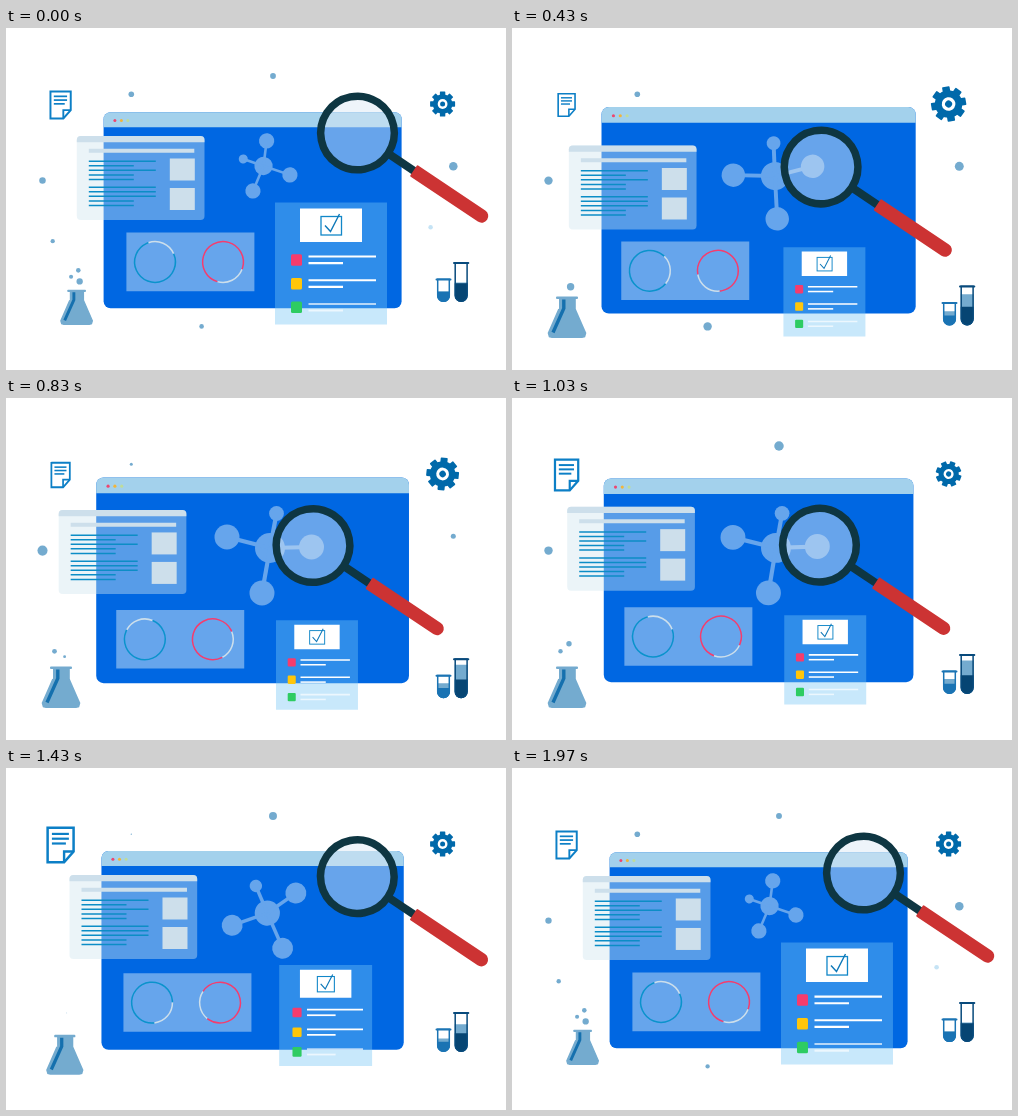
An HTML page with a canvas that plays this animation: 500x342 px, repeating every 2000 ms.

```html
<!DOCTYPE html>
<html lang="en">
<head>
<meta charset="utf-8">
<title>Research dashboard</title>
<style>
html, body { margin: 0; width: 100%; height: 100%; overflow: hidden; background: #fff; }
canvas { display: block; }
</style>
</head>
<body>
<canvas id="stage" width="500" height="342"></canvas>
<script>
const g = document.getElementById('stage').getContext('2d');
const LOOP = 2000, FADE = 130, TAU = Math.PI * 2, RAD = Math.PI / 180;
const MIST = '#cddfeb', SKY = '#66a5ec', DOT = '#74abcf', PINK = '#f53c6d', TEAL = '#0a93cc';
let t = 0;

const clamp = u => Math.min(1, Math.max(0, u));
const mix = (a, b, p) => a + (b - a) * p;
const ease = (from, to) => (1 - Math.cos(Math.PI * clamp((t - from) / (to - from)))) / 2;
// Rises from 0 to 1 between a and b, falls back to 0 between c and d.
const swing = (a, b, c, d) => ease(a, b) * (1 - ease(c, d));
// The tempo shared by the parts that drift out and slowly return.
const drift = () => swing(0, 583, 600, LOOP);
const linger = () => swing(0, 583, 975, LOOP);

function box(x, y, w, h, color, r = 0) {
  g.fillStyle = color;
  g.beginPath();
  g.roundRect(x, y, w, h, r);
  g.fill();
}

function dot(x, y, r, color) {
  g.fillStyle = color;
  g.beginPath();
  g.arc(x, y, r, 0, TAU);
  g.fill();
}

// A dot that pops in at one time and out at another, changing its radius in between.
function speck(x, y, on, off, r0, r1 = r0, color = DOT) {
  const age = (t - on + LOOP) % LOOP, span = off - on;
  const size = clamp(Math.min(age, span - age) / FADE);
  dot(x, y, mix(r0, r1, clamp(age / span)) * size, color);
}

function arc(x, y, r, from, to, color, width) {
  g.strokeStyle = color;
  g.lineWidth = width;
  g.beginPath();
  g.arc(x, y, r, from * RAD, to * RAD);
  g.stroke();
}

function trace(points) {
  g.beginPath();
  for (let i = 0; i < points.length; i += 2) g.lineTo(points[i], points[i + 1]);
}

function line(color, width, ...points) {
  g.strokeStyle = color;
  g.lineWidth = width;
  trace(points);
  g.stroke();
}

function group(x, y, scale, angle, draw) {
  g.save();
  g.translate(x, y);
  g.rotate(angle * RAD);
  g.scale(scale, scale);
  draw();
  g.restore();
}

const zoom = () => swing(0, 500, 500, 1900);

function browser() {
  group(246.6, 182.3, mix(1, 1.057, zoom()), 0, () => {
    box(-149, -98, 298, 196, '#0067e2', 7);
    box(-149, -98, 298, 15, '#a3d1ec', [7, 7, 0, 0]);
    ['#ee4670', '#f2b53a', '#bfdc9a'].forEach((c, i) => dot(-137.7 + i * 6.5, -89.7, 1.5, c));
  });
}

function molecule() {
  const p = linger();
  group(mix(257.5, 264, p), mix(138, 150, p), mix(.61, 1, p), mix(-81.5, 0, p), () => {
    dot(0, 0, 15, SKY);
    for (const [x, y, r] of [[6.5, -34.5, 7.4], [-43, -11, 12.5], [41.5, -1, 12.5], [-8, 45, 12.5]]) {
      line(SKY, 4.2, 0, 0, x, y);
      dot(x, y, r, SKY);
    }
  });
}

function article() {
  const x = mix(70.8, 52, swing(0, 650, 670, LOOP));
  const y = 108 + 9.5 * swing(0, 430, 430, 1150) - 2 * swing(1230, 1630, 1630, LOOP);
  group(x, y, 1, 0, () => {
    box(0, 0, 127.7, 84, 'rgba(208,229,238,.42)', 4);
    box(0, 0, 127.7, 6.3, MIST, [4, 4, 0, 0]);
    box(12, 12.7, 105.5, 4, MIST);
    [[67, 45, 67, 45, 45], [67, 67, 67, 45, 45]].forEach((widths, k) => {
      const top = 24.5 + k * 26;
      widths.forEach((w, i) => box(12, top + i * 4.55, w, 1.5, '#0c8dc6'));
      box(93, 22.5 + k * 29.5, 25, 22, MIST);
    });
  });
}

function rings() {
  const p = zoom(), turn = 375 * swing(200, 1050, 950, 1700);
  group(mix(120.4, 108.7, p), mix(204.6, 214.3, p * p), 1, 0, () => {
    box(0, 0, 128, 58.6, SKY);
    [[28.6, TEAL, -109], [96.6, PINK, 21]].forEach(([x, color, start]) => {
      const a = start + turn;
      arc(x, 29.4, 20.4, a, a + 85, MIST, 1.5);
      arc(x, 29.4, 20.4, a + 85, a + 360, color, 1.5);
    });
  });
}

function checklist() {
  const p = drift(), s = mix(1, .732, swing(0, 400, 1100, 1900));
  group(mix(325, 310, p), mix(235.5, 269.2, p), s, 0, () => {
    g.translate(-56, -61);
    box(0, 0, 112, 122, 'rgba(119,198,245,.4)');
    box(25, 6, 62, 33.5, '#fff');
    g.strokeStyle = '#1187c8';
    g.lineWidth = 1.3;
    g.strokeRect(46, 14, 20.5, 18.5);
    line('#0e78b8', 1.4, 50, 23, 55.5, 29, 64.5, 11.5);
    [PINK, '#ffc60a', '#2ecc62'].forEach((c, i) => {
      const top = 51.7 + i * 23.7, ink = i < 2 ? '#fff' : 'rgba(255,255,255,.65)';
      box(16, top, 11, 11.5, c, 1.5);
      box(33.5, top + 1.3, 67.5, 2.1, ink);
      box(33.5, top + 7.9, 34.5, 2.1, ink);
    });
  });
}

function magnifier() {
  const x = mix(351.5, 307, swing(0, 500, 1000, 1450));
  const y = mix(105, 147.5, swing(0, 610, 1000, 1530));
  group(x, y, 1, 33.8, () => {
    box(38, -4, 34, 8, '#0e3642');
    box(67.5, -6.7, 88.5, 13.4, '#cc3333', [1, 6.7, 6.7, 1]);
    dot(0, 0, 34, 'rgba(218,231,244,.47)');
    arc(0, 0, 36.8, 0, 360, '#0e3642', 7.5);
  });
}

function page() {
  const s = .78 - .17 * swing(0, 630, 630, 1000) + .22 * swing(800, 1250, 1400, LOOP);
  group(54.6, 77, s, 0, () => {
    const ink = '#0c7fc6';
    line(ink, 2.5, -13, -17.3, 13, -17.3, 13, 6.5, 3.5, 17.3, -13, 17.3, -13, -18.5);
    line(ink, 2.4, 3.5, 17, 3.5, 6.5, 13, 6.5);
    [17, 17, 14].forEach((w, i) => box(-8.7, -12.2 + i * 4.8, w, 2.2, ink));
  });
}

function gear() {
  const p = swing(0, 600, 630, 1100), ink = '#0069aa';
  group(436.6, 76, mix(1, 1.49, p), 375 * p, () => {
    for (let i = 0; i < 8; i++) group(0, 0, 1, i * 45, () => box(-2.7, -12.5, 5.4, 8, ink, .6));
    dot(0, 0, 9.8, ink);
    dot(0, 0, 4.9, '#fff');
    dot(0, 0, 2.5, ink);
  });
}

function specks() {
  speck(125.3, 66.2, 1400, 2900, 2.8);
  speck(267, 48, 900, 2250, 5, 2.4);
  speck(36.5, 152.6, 1800, 3130, 2.8, 5.7);
  speck(447.3, 138.3, 1450, 2900, 4, 4.7);
  speck(424.6, 199.3, 1450, 2250, 3, 1.9, '#c5e3f5');
  speck(46.7, 213.2, 1450, 2250, 3.4, 1.6);
  speck(195.6, 298.4, 1800, 2560, 1.4, 4.8);
}

function flask() {
  const p = swing(0, 400, 1200, 1900);
  group(mix(70.6, 55, p), mix(297, 310, p), mix(.85, 1, p), 0, () => {
    box(-11, -41.5, 22, 2.6, DOT, 1);
    trace([-8, -40, 8, -40, 8, -29, 18.5, -5, 17.5, -1.5, 15, -.8, -15, -.8, -17.5, -1.5, -18.5, -5, -8, -29]);
    g.fillStyle = g.strokeStyle = DOT;
    g.lineWidth = 1.6;
    g.fill();
    g.stroke();
    line('#1570ae', 3.4, -3.2, -38.5, -3.2, -29.5, -14, -5.5);
    speck(3.6, -51.3, 1560, 2880, 3.7);
    for (const [on, off] of [[520, 1150], [1820, 2250]]) speck(-6.5, -56.7, on, off, 2.4);
    for (const [on, off] of [[880, 1450], [1820, 2250]]) speck(2, -64.3, on, off, 2.7);
  });
}

function tube(x, y, w, h, ink, fill, light, dark) {
  const r = w / 2;
  g.save();
  g.beginPath();
  g.roundRect(x, y, w, h, [0, 0, r, r]);
  g.clip();
  box(x, y + light, w, h, DOT);
  box(x, y + dark, w, h, fill);
  g.restore();
  g.strokeStyle = ink;
  g.lineWidth = 1.5;
  g.beginPath();
  g.roundRect(x + .7, y + .7, w - 1.4, h - 1.4, [0, 0, r, r]);
  g.stroke();
  box(x - 1.5, y, w + 3, 2, ink, 1);
}

function tubes() {
  const y = 28 * drift(), p = linger();
  tube(448.5, 234 + y, 13.3, 40, '#084a7c', '#064573', mix(20.5, 6.5, p), 21.3);
  tube(431, 250.5 + y, 13, 23.5, '#1b74b4', '#1a73b3', mix(12.5, 8.5, p), 13.4);
}

const parts = [browser, molecule, article, rings, checklist, magnifier, page, gear, specks, flask, tubes];
const start = performance.now();

function frame() {
  const now = (performance.now() - start) % LOOP;
  // 30 pictures per second, each starting on a whole 10 ms
  t = Math.round(Math.floor((now + 4) * .03) / .3) * 10 % LOOP;
  g.clearRect(0, 0, 500, 342);
  for (const draw of parts) draw();
  requestAnimationFrame(frame);
}
frame();
</script>
</body>
</html>
```
